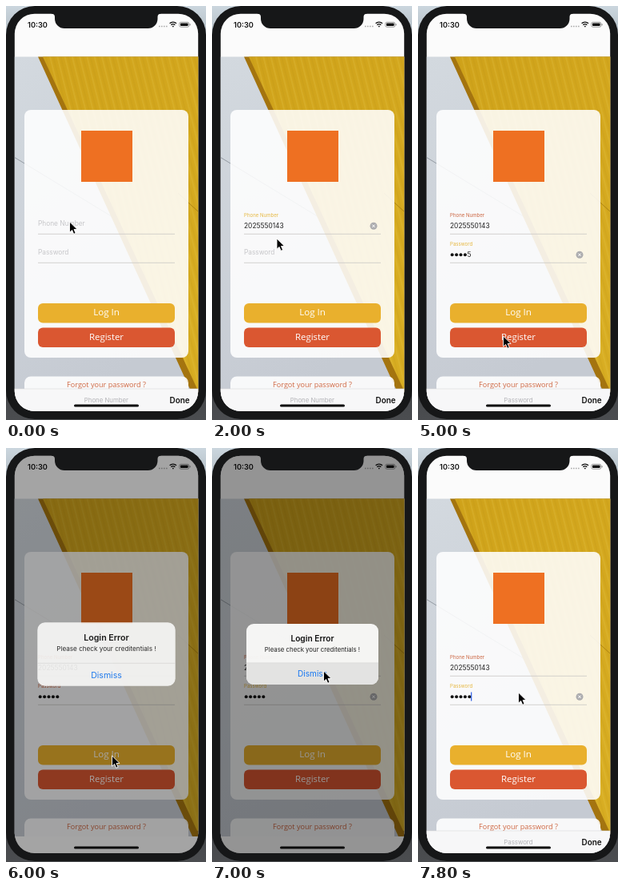
Animation, 250 px wide and 518 px high, one loop 8000 ms. Source, as an HTML page:

```html
<!DOCTYPE html>
<html lang="en">
<head>
<meta charset="utf-8">
<title>Login form</title>
<style>
  html, body { margin: 0; width: 100%; height: 100%; overflow: hidden; background: #161718; }
  svg { display: block; width: 100vw; height: 100vh; }
  text { font-family: Inter, sans-serif; white-space: pre; }
  .brand { font-family: "Open Sans", sans-serif; text-anchor: middle; }
  .mid { text-anchor: middle; }
  .hint { font-size: 8.3px; fill: #c6c6c9; }
  .label { font-size: 6.1px; }
  .value { font-size: 8.4px; fill: #222; }
  .rule { stroke: #cbc8c6; stroke-width: .8; }
  .caret { fill: #3b68e6; }
</style>
</head>
<body>
<svg viewBox="0 0 250 518" preserveAspectRatio="none">
  <defs>
    <clipPath id="screen"><rect x="10.8" y="9.7" width="229.4" height="497.3" rx="25"/></clipPath>
    <linearGradient id="desk" x2="0" y2="1">
      <stop offset="0" stop-color="#cbd6de"/><stop offset=".5" stop-color="#26282a"/><stop offset="1" stop-color="#4b4d50"/>
    </linearGradient>
    <linearGradient id="boards" x2=".4" y2="1">
      <stop offset="0" stop-color="#d3d9df"/><stop offset="1" stop-color="#c5cad2"/>
    </linearGradient>
    <linearGradient id="yellow" x2=".5" y2="1">
      <stop offset="0" stop-color="#cfa21a"/><stop offset="1" stop-color="#d8ad22"/>
    </linearGradient>
    <pattern id="grain" width="9" height="60" patternUnits="userSpaceOnUse" patternTransform="rotate(-14)">
      <path d="M2 0V60" stroke="#e6c549" stroke-width="1" opacity=".45"/>
      <path d="M6 0V60" stroke="#b88c10" stroke-width="1" opacity=".3"/>
    </pattern>
    <g id="clear">
      <circle r="4.5" fill="#adadaf"/>
      <path d="M-1.7-1.7 1.7 1.7M1.7-1.7-1.7 1.7" stroke="#fff" stroke-width="1"/>
    </g>
  </defs>

  <rect width="250" height="518" fill="url(#desk)"/>
  <rect width="250" height="517" rx="36" fill="#161718"/>

  <g clip-path="url(#screen)">
    <rect x="10" y="9" width="231" height="498" fill="#fbfbfb"/>

    <!-- backdrop -->
    <rect x="10" y="63.5" width="231" height="422.5" fill="url(#boards)"/>
    <path d="M10 189 240 329" stroke="#8d939b" stroke-width=".9"/>
    <path d="M40 63.500H241V486H233Z" fill="#a4740f"/>
    <path d="M46 63.500H241V479H239Z" fill="url(#yellow)"/>
    <path d="M46 63.500H241V479H239Z" fill="url(#grain)"/>
    <path d="M215 234 241 258" stroke="#a87d10" stroke-width=".9"/>

    <!-- cards -->
    <g fill="#fff" fill-opacity=".88">
      <rect x="23" y="130" width="205" height="310" rx="8"/>
      <path d="M23 486V471.500a8 8 0 0 1 8-8H220a8 8 0 0 1 8 8V486Z"/>
    </g>
    <rect x="94" y="156" width="64" height="64" fill="#ee7022"/>
    <rect x="40" y="372" width="171" height="24.5" rx="6" fill="#e9b02d"/>
    <rect x="40" y="402.5" width="171" height="24.5" rx="6" fill="#da5731"/>
    <text class="brand" x="125.5" y="387" font-size="11.6" fill="#fff">Log In</text>
    <text class="brand" x="125.5" y="417.6" font-size="11.4" fill="#fff">Register</text>
    <text class="brand" x="125.5" y="476.7" font-size="9.1" fill="#cf6843">Forgot your password ?</text>

    <g id="phone"></g>
    <g id="password"></g>

    <!-- keyboard accessory -->
    <g id="bar">
      <rect x="10" y="479" width="231" height="30" fill="#f7f7f8"/>
      <path d="M10 479H241" stroke="#d9d9db" stroke-width=".6"/>
      <text id="barHint" class="mid" x="125.4" y="495.7" font-size="7.8" fill="#b4b4b8"></text>
      <text x="204.5" y="496.5" font-size="9.9" font-weight="600" fill="#111">Done</text>
    </g>

    <!-- status bar -->
    <text x="27" y="26.6" font-size="9.2" font-weight="600" fill="#111">10:30</text>
    <path d="M191 25.5H202" stroke="#aaa" stroke-width="1.6" stroke-dasharray="1.6 1.4"/>
    <g fill="none" stroke="#111" stroke-width="1.3">
      <path d="M204.6 21.8a6 6 0 0 1 8.4 0M206.3 23.8a3.6 3.6 0 0 1 5 0"/>
      <path d="M208 25.5h1.6" stroke-width="1.6"/>
    </g>
    <rect x="216.8" y="20.3" width="12" height="6" rx="1.8" fill="none" stroke="#777" stroke-width=".7"/>
    <rect x="218" y="21.5" width="9.6" height="3.6" rx=".8" fill="#111"/>
    <path d="M230 22.3v2" stroke="#777" stroke-width="1"/>

    <rect id="dim" x="10" y="9" width="231" height="498"/>
    <rect x="85" y="498.6" width="81" height="3" rx="1.5" fill="#0b0b0b"/>

    <g id="alert">
      <rect x="43" y="220" width="165" height="76" rx="9" fill="#f8f8f7" fill-opacity=".97"/>
      <path id="pressed" d="M43 269H208V287a9 9 0 0 1-9 9H52a9 9 0 0 1-9-9Z" fill="#e3e3e2"/>
      <path d="M43 268.8H208" stroke="#d0d0d0" stroke-width=".6"/>
      <g class="mid">
        <text x="125.5" y="241.8" font-size="10.2" font-weight="600" fill="#111">Login Error</text>
        <text x="125.5" y="254.6" font-size="7.8" fill="#222">Please check your creditentials !</text>
        <text x="125.5" y="286.3" font-size="10.1" fill="#1677f2">Dismiss</text>
      </g>
    </g>
  </g>

  <path d="M57 9V9.700q4 0 4 4V16a12 12 0 0 0 12 12H177.500a12 12 0 0 0 12-12V13.700q0-4 4-4V9Z" fill="#161718"/>
  <path id="pointer" d="M0 0V13.200L3.100 10.400 5.200 15.300 7.600 14.300 5.500 9.500H9.600Z" fill="#000" stroke="#fff" stroke-width=".9" stroke-linejoin="round"/>
</svg>

<script>
const LOOP = 8000, STEP = 200;
const PHONE = '2025550143', PIN = '12345';
const $ = id => document.getElementById(id);

// Rows are [time, ...values]
const tracks = {
  pointer: [[0, 79.5, 270], [1400, 79.5, 270], [2000, 81, 291], [2400, 83, 306], [3000, 89, 307],
    [3800, 99, 306], [4400, 99, 310], [5000, 106.6, 413], [5400, 132.5, 385], [6200, 132.5, 385],
    [6800, 139.5, 279], [7200, 139.5, 279], [7800, 125.5, 306]],
  dim: [[5800, 0], [6000, .35], [6200, .41], [7000, .41], [7400, 0]],
  alpha: [[5800, 0], [6000, .93], [6200, 1], [7000, 1], [7400, 0]],
  scale: [[5800, 1.1], [6000, 1.045], [6200, 1]],
  bar: [[5600, 0], [5900, 30], [7200, 30], [7400, 0]]
};

function at(track, t) {
  const i = track.findIndex(row => row[0] > t);
  if (i === 0) return track[0].slice(1);
  if (i < 0) return track[track.length - 1].slice(1);
  const a = track[i - 1], b = track[i], k = (t - a[0]) / (b[0] - a[0]);
  return a.slice(1).map((v, j) => v + (b[j + 1] - v) * k);
}

const typed = (t, start, gap, max) => Math.max(0, Math.min(max, Math.floor((t - start) / gap) + 1));

function drawField(id, name, y, focused, caretOn, count, content, width) {
  const filled = count > 0;
  $(id).innerHTML =
    `<path class="rule" d="M40 ${y + 10.3}H211"/>` +
    (filled
      ? `<text class="label" x="40" y="${y - 10.6}" fill="${focused ? '#e6b840' : '#cb6540'}">${name}</text>${content}`
      : `<text class="hint" x="40" y="${y + .2}">${name}</text>`) +
    (focused && filled ? `<use href="#clear" x="202" y="${y + .3}"/>` : '') +
    (focused && caretOn ? `<rect class="caret" x="${40 + width}" y="${y - 5.5}" width="1.3" height="11"/>` : '');
}

function render(t) {
  const onPhone = t < 2600;
  const onPin = !onPhone && (t < 5600 || t >= 7000);
  const blink = t % 1000 >= 300 && t % 1000 < 900;

  const n = typed(t, 200, 150, 10);
  drawField('phone', 'Phone Number', 275, onPhone, blink, n,
    `<text class="value" x="40" y="278">${PHONE.slice(0, n)}</text>`, n * 5.15);

  const p = typed(t, 3400, 400, 5);
  const masked = t >= 5400 ? p : p - 1;
  let dots = '';
  for (let i = 0; i < masked; i++) dots += `<circle cx="${42.7 + i * 5.4}" cy="311.2" r="2" fill="#151515"/>`;
  if (masked < p && p) dots += `<text class="value" x="${40 + masked * 5.4}" y="314.2">${PIN[p - 1]}</text>`;
  drawField('password', 'Password', 311, onPin, blink && (t < 5600 || t >= 7400), p, dots, p * 5.2);

  $('barHint').textContent = onPhone ? 'Phone Number' : 'Password';
  $('bar').setAttribute('transform', `translate(0 ${at(tracks.bar, t)})`);
  $('dim').setAttribute('opacity', at(tracks.dim, t));
  $('alert').setAttribute('opacity', at(tracks.alpha, t));
  $('alert').setAttribute('transform', `translate(125.5 258) scale(${at(tracks.scale, t)}) translate(-125.5 -258)`);
  $('pressed').setAttribute('opacity', t >= 7000 ? 1 : 0);
  $('pointer').setAttribute('transform', `translate(${at(tracks.pointer, t).join(' ')})`);
}

const begin = performance.now();
function tick() {
  const t = (performance.now() - begin) % LOOP;
  render(Math.floor(t / STEP) * STEP);
  requestAnimationFrame(tick);
}
tick();
</script>
</body>
</html>
```
